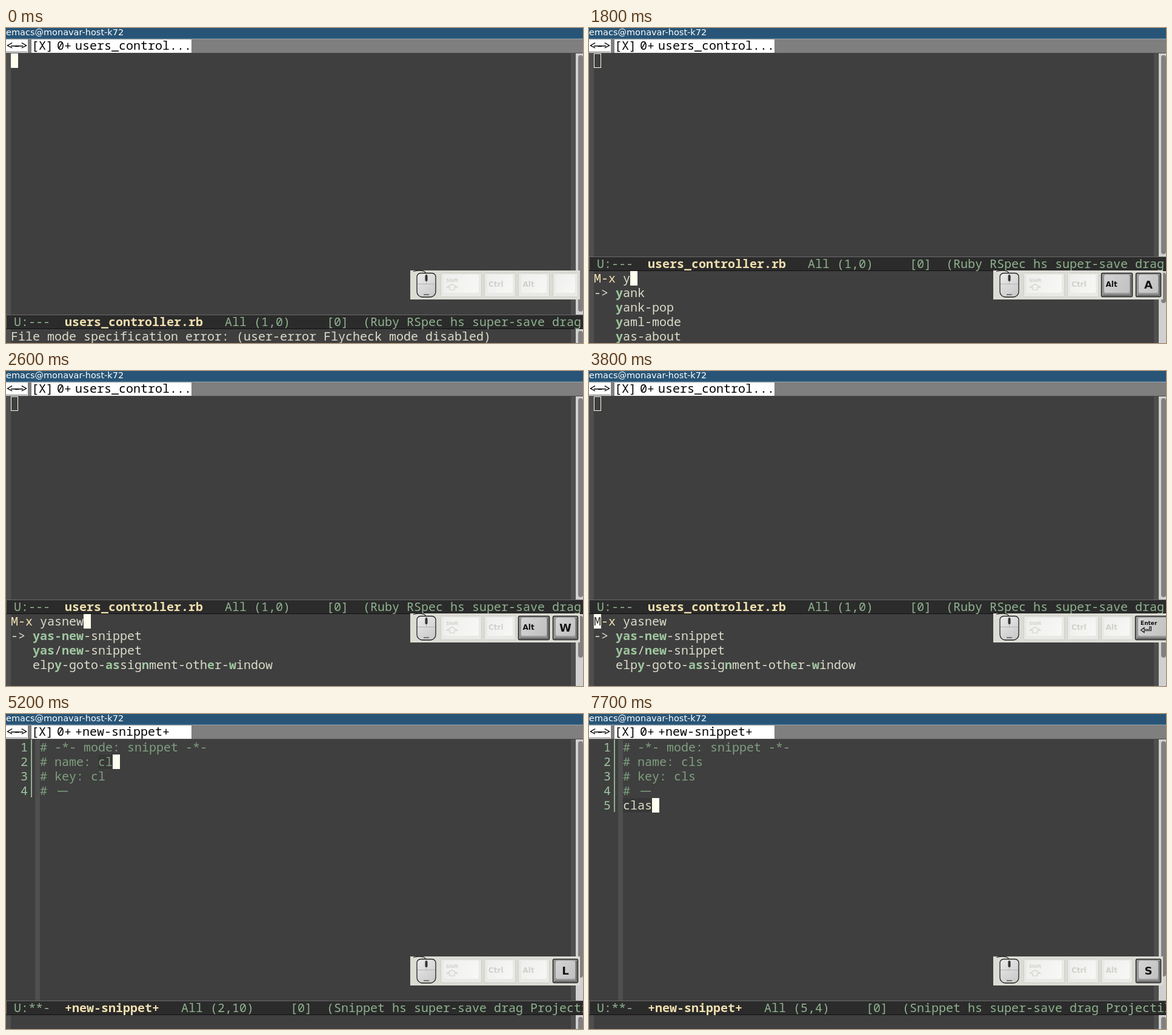
These frames come from a looping animation (952 px wide and 521 px high, 8 s). An HTML page with a canvas:

```html
<!DOCTYPE html>
<html lang="en">
<head>
<meta charset="utf-8">
<title>New snippet</title>
<style>
  html, body { margin: 0; height: 100%; overflow: hidden; background: #3f3f3f; }
  canvas { display: block; }
</style>
</head>
<body>
<canvas id="stage" width="952" height="521"></canvas>
<script>
const ctx = document.getElementById('stage').getContext('2d');
const W = 952, H = 521, CELL = 12, ROW = 24, LOOP = 8000;
const MONO = '20px "Noto Sans Mono", monospace';
const SANS = '"DejaVu Sans", sans-serif';
const FG = '#dcdccc', BG = '#3f3f3f', FRINGE = '#4f4f4f', GREEN = '#8fb28f',
      LIGHT_GREEN = '#9fc59f', COMMENT = '#7f9f7f', YELLOW = '#f0dfaf', CURSOR = '#fffff0';

// Completion rows; asterisks toggle the bold match.
const recent = ['yas-new-snippet', 'yas-reload-all', 'ruby-mode', 'eval-buffer'];
const forY = ['*y*ank', '*y*ank-pop', '*y*aml-mode', '*y*as-about'];
const forYa = ['*ya*nk', '*ya*nk-pop', '*ya*ml-mode', '*ya*s-about'];
const forYas = ['*yas*-about', '*yas*-expand', '*yas*-next-field', '*yas*-new-snippet'];
const forYasn = ['*yas-n*ext-field', '*yas-n*ew-snippet', '*yas*/*n*ew-snippet', '*yas*-mi*n*or-mode'];
const forYasne = ['*yas-ne*w-snippet', '*yas-ne*xt-field', '*yas*/*ne*w-snippet', '*yas*/*ne*xt-field'];
const forYasnew = ['*yas-new*-snippet', '*yas*/*new*-snippet', 'elp*y*-goto-*as*sig*n*ment-oth*e*r-*w*indow'];

// Each step changes part of the state from its time on.
const steps = [
  [0, { cursor: true, tabs: true, key: '', thumb: 469, row: 0, col: 0, field: 0, name: '', body: '',
        echo: 'File mode specification error: (user-error Flycheck mode disabled)' }],
  [400, { cursor: false }],
  [900, { cursor: true, alt: true }],
  [1200, { key: 'X' }],
  [1400, { mini: true, typed: '', list: recent, thumb: 374, miniThumb: 440 }],
  [1700, { key: 'Y', typed: 'y', list: forY, miniThumb: 455 }],
  [1800, { key: 'A' }],
  [1900, { key: 'S', typed: 'ya', list: forYa }],
  [2000, { typed: 'yas', list: forYas, miniThumb: 462 }],
  [2200, { key: 'N', typed: 'yasn', list: forYasn, miniThumb: 468 }],
  [2400, { key: 'E', typed: 'yasne', list: forYasne }],
  [2600, { key: 'W', typed: 'yasnew', list: forYasnew, miniThumb: 474 }],
  [3200, { cursor: false, alt: false, key: '' }],
  [3700, { cursor: true, key: 'Enter' }],
  [3800, { home: true }],
  [3900, { mini: false, snippet: true, tabs: false, row: 1, col: 8, thumb: 438,
           echo: 'You can run the command ‘yas-new-snippet’ with C-c & C-n' }],
  [4300, { key: '' }],
  [5100, { key: 'C', tabs: true, name: 'c', col: 9, thumb: 436, echo: '', field: 1 }],
  [5200, { key: 'L', name: 'cl', col: 10 }],
  [5400, { key: 'S', name: 'cls', col: 11, thumb: 434 }],
  [5900, { key: 'Tab' }],
  [6000, { row: 2, col: 7, field: 2 }],
  [6200, { row: 4, col: 0, field: 0 }],
  [6800, { cursor: false, key: '' }],
  [7200, { cursor: true, key: 'C', body: 'c', col: 1 }],
  [7400, { key: 'L', body: 'cl', col: 2 }],
  [7500, { key: 'A', body: 'cla', col: 3 }],
  [7700, { key: 'S', body: 'clas', col: 4 }],
];

function rect(x, y, w, h, color) {
  ctx.fillStyle = color;
  ctx.fillRect(x, y, w, h);
}

function label(str, x, baseline, color, font) {
  ctx.font = font;
  ctx.fillStyle = color;
  ctx.fillText(str, x, baseline);
}

function mono(str, x, top, color = FG, bold = false) {
  label(str, x, top + 19, color, (bold ? 'bold ' : '') + MONO);
  return x + str.length * CELL;
}

function rounded(x, y, w, h, r, fill, stroke, width = 1) {
  ctx.beginPath();
  ctx.roundRect(x, y, w, h, r);
  ctx.fillStyle = fill;
  ctx.fill();
  if (stroke) {
    ctx.strokeStyle = stroke;
    ctx.lineWidth = width;
    ctx.stroke();
  }
}

function line(color, width, ...points) {
  ctx.beginPath();
  points.forEach(([x, y]) => ctx.lineTo(x, y));
  ctx.strokeStyle = color;
  ctx.lineWidth = width;
  ctx.stroke();
}

function shade(x0, y0, x1, y1, from, to) {
  const g = ctx.createLinearGradient(x0, y0, x1, y1);
  g.addColorStop(0, from);
  g.addColorStop(1, to);
  return g;
}

function drawCursor(x, top, under = '') {
  rect(x, top, CELL, ROW, CURSOR);
  mono(under, x, top, BG);
}

function drawScrollbar(top, bottom, thumbEnd) {
  rect(932, top, 8, bottom - top, FRINGE);
  rect(940, top, 12, bottom - top, '#d0d0d0');
  rounded(944, top + 3, 8, thumbEnd - top - 3, 4, '#808080');
}

function drawTabs(s) {
  rect(0, 18, W, ROW, '#7f7f7f');
  rect(0, 18, W, 1, '#989898');
  rect(0, 41, W, 1, '#4c4c4c');
  rect(0, 19, 36, 22, '#fff');
  rect(42, 19, 264, 22, '#fff');
  rect(0, 39, 35, 1, '#777');
  mono('<->', 0, 17, '#000');
  rect(8, 29, 20, 1.5, '#000');
  mono('[X]', 42, 17, '#000');
  mono('0+', 84, 17, '#000');
  mono(s.snippet ? '+new-snippet+' : 'users_control...', 114, 17, '#000');
}

function drawModeLine(s, top) {
  rect(0, top, W, ROW, '#2b2b2b');
  rect(0, top, W, 1, '#6b6b6b');
  rect(0, top, 1, ROW, '#6b6b6b');
  rect(0, top + 23, W, 1, '#111');
  mono(s.snippet ? 'U:**-' : 'U:---', 13, top, GREEN);
  const x = mono(s.snippet ? '+new-snippet+' : 'users_controller.rb', 97, top, YELLOW, true);
  const modes = s.snippet ? '(Snippet hs super-save drag Projectile' : '(Ruby RSpec hs super-save drag';
  mono(`   All (${s.row + 1},${s.col})     [0]  ${modes}`, x, top, GREEN);
}

function drawSnippet(s, top) {
  const lines = ['# -*- mode: snippet -*-', '# name: ' + s.name, '# key: ' + s.name, '#'];
  if (s.body) lines.push(s.body);
  if (s.field) rect(s.field === 1 ? 152 : 140, top + s.field * ROW, s.name.length * CELL, ROW, '#383838');
  lines.forEach((str, i) => {
    const y = top + i * ROW;
    mono(String(i + 1), 24, y, LIGHT_GREEN);
    rect(41, y - 1, 2, ROW, GREEN);
    if (i === 4) rect(56, y, str.length * CELL, ROW, '#383838');
    mono(str, 56, y, i < 4 ? COMMENT : FG);
  });
  rect(85, top + 3 * ROW + 12, 17, 1.5, COMMENT);
}

function drawMinibuffer(s) {
  const top = 402;
  rect(0, top, 8, H - top, FRINGE);
  drawScrollbar(top, H, s.miniThumb);
  mono(s.typed, mono('M-x ', 8, top, YELLOW), top);
  s.list.forEach((item, i) => {
    const y = top + (i + 1) * ROW;
    if (!i) mono('->', 8, y);
    let x = 44;
    item.split('*').forEach((part, j) => {
      x = mono(part, x, y, j % 2 ? LIGHT_GREEN : FG, j % 2 === 1);
    });
  });
  if (!s.cursor) return;
  if (s.home) drawCursor(8, top, 'M');
  else drawCursor(56 + s.typed.length * CELL, top);
}

function drawKey(x, w, on) {
  rounded(x + .5, 405.5, w - 1, 39, 2, on ? '#989898' : '#e9e9e6', on ? '#222' : '#cfcfca', on ? 1.5 : 1);
  if (on) line('#6c6c6c', 3, [x + 3, 442.5], [x + w - 2.5, 442.5], [x + w - 2.5, 408]);
  rounded(x + 5, 408, w - 10, 30, 3, on ? shade(x, 408, x + w, 438, '#d6d6d6', '#bebebe')
                                       : shade(x, 408, x + w, 438, '#eeeeec', '#f8f8f6'));
}

function drawMouse() {
  ctx.beginPath();
  ctx.moveTo(672, 402.5);
  ctx.quadraticCurveTo(692, 398, 693.5, 408);
  ctx.strokeStyle = '#222';
  ctx.lineWidth = 1.2;
  ctx.stroke();
  rounded(678, 405.5, 31, 39.5, [6, 6, 9, 9], shade(678, 405, 709, 445, '#ececec', '#c6c6c6'), '#222', 1.3);
  line('#b4b4b4', 1, [679, 423.5], [708, 423.5]);
  line('#b4b4b4', 1, [693.5, 407], [693.5, 423]);
  rounded(691.5, 408, 4, 11, 2, '#333');
  rect(689, 440, 9, 2, '#777');
}

function drawWideKey(key) {
  drawKey(901, 62, true);
  label(key, 910, 420, '#111', 'bold 9px ' + SANS);
  if (key === 'Enter') {
    line('#111', 1.2, [927.5, 423], [927.5, 429.5], [916, 429.5], [916, 432.5], [910.5, 428.5],
         [916, 424.5], [916, 427.5], [925, 427.5], [925, 423], [928, 423]);
    return;
  }
  line('#111', 1.5, [911, 423], [911, 429]);
  line('#111', 1.5, [927, 426], [912, 426]);
  line('#111', 1.5, [916, 423.5], [912.5, 426], [916, 428.5]);
  line('#111', 1.5, [927, 428], [927, 434]);
  line('#111', 1.5, [911, 431], [926, 431]);
  line('#111', 1.5, [922, 428.5], [925.5, 431], [922, 433.5]);
}

function drawKeys(s) {
  const faded = '#d0d0cc', wide = s.key.length > 1;
  rect(667, 401, wide ? 285 : 280, 48, '#dcdcd5');
  drawMouse();
  drawKey(717, 68, false);
  label('Shift', 726, 420, faded, 'bold 7.5px ' + SANS);
  line(faded, 1.2, [732, 433], [732, 429], [727.5, 429], [736, 423.5], [744.5, 429], [740, 429], [740, 433], [732, 433]);
  drawKey(789, 52, false);
  label('Ctrl', 796, 428, faded, 'bold 12px ' + SANS);
  drawKey(845, 52, s.alt);
  label('Alt', 852.5, 428, s.alt ? '#111' : faded, 'bold 12px ' + SANS);
  if (wide) return drawWideKey(s.key);
  drawKey(902, 42, s.key);
  ctx.textAlign = 'center';
  label(s.key, 923, 431, '#111', 'bold 18px ' + SANS);
  ctx.textAlign = 'left';
}

function draw(time) {
  const s = {};
  for (const [start, change] of steps) if (start <= time) Object.assign(s, change);
  const top = s.tabs ? 42 : 18, bottom = s.mini ? 378 : 474;

  rect(0, 0, W, H, BG);
  rect(0, 0, W, 18, '#285577');
  rect(0, 17, W, 1, '#4c7899');
  label('emacs@monavar-host-k72', 0, 12, '#fff', '14.5px ' + SANS);
  if (s.tabs) drawTabs(s);

  const left = s.snippet ? 56 : 8, textTop = s.snippet ? top + 1 : top;
  rect(left - 8, top, 8, bottom - top, FRINGE);
  drawScrollbar(top, bottom, s.thumb);
  if (s.snippet) drawSnippet(s, textTop);

  const x = left + s.col * CELL, y = textTop + s.row * ROW;
  if (s.mini) {
    ctx.strokeStyle = CURSOR;
    ctx.lineWidth = 1;
    ctx.strokeRect(x + .5, y + .5, CELL - 1, ROW - 1);
  } else if (s.cursor) {
    drawCursor(x, y, s.row === 2 ? s.name[0] : '');
  }

  drawModeLine(s, bottom);
  if (s.mini) {
    drawMinibuffer(s);
  } else {
    rect(0, 498, 8, 23, FRINGE);
    drawScrollbar(498, H, H + 8);
    mono(s.echo, 8, 498);
  }
  drawKeys(s);
}

function frame() {
  draw(performance.now() % LOOP);
  requestAnimationFrame(frame);
}
frame();
</script>
</body>
</html>
```
